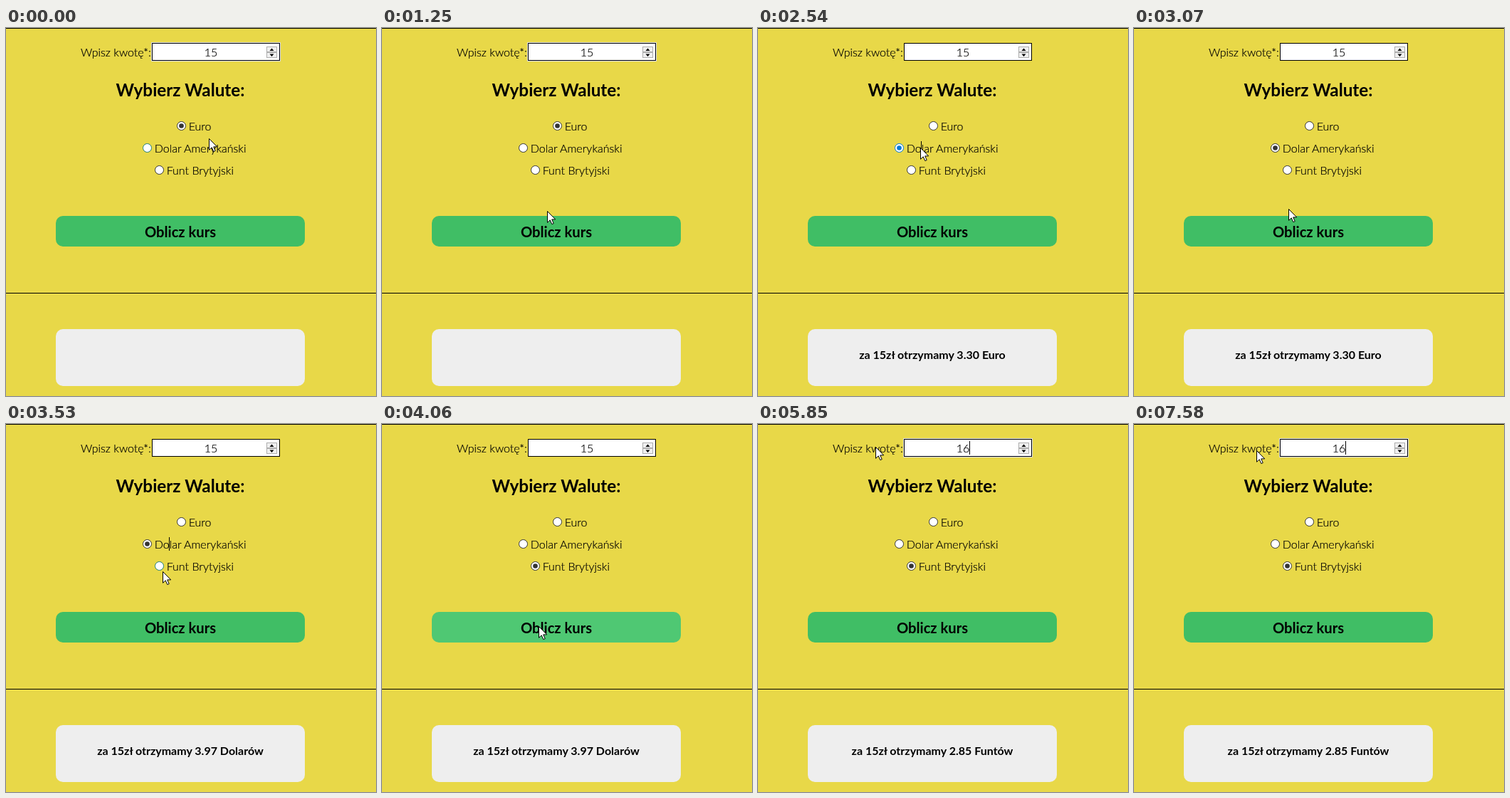
Write an HTML page that moves like this. It is 520x517 px and loops after 8000 ms.

```html
<!DOCTYPE html>
<html lang="pl">
<head>
<meta charset="utf-8">
<title>Kalkulator walut</title>
<style>
  html, body { margin: 0; width: 100%; height: 100%; overflow: hidden; background: #e8d848; }
  svg { display: block; width: 520px; height: 517px; }
  text { font: 300 16px Lato, sans-serif; stroke: #000; stroke-width: .2px; }
  .bold { font-weight: 700; stroke: none; }
  .mid { text-anchor: middle; }
</style>
</head>
<body>
<svg viewBox="0 0 520 517">
  <rect width="520" height="517" fill="#e8d848"/>
  <path d="M0 .5H520M0 372.5H520" stroke="#000"/>

  <text x="105" y="40">Wpisz kwotę*:</text>
  <rect id="focus" x="204" y="20" width="182" height="27" rx="1" fill="#dfe3f0"/>
  <rect x="205.5" y="21.5" width="179" height="24" fill="#fff" stroke="#000"/>
  <rect id="mark" x="279" y="24" width="18" height="19" fill="#0078d7"/>
  <text id="amount" class="mid" x="288" y="40">15</text>
  <rect id="caret" y="24" width="1" height="19"/>
  <g fill="#f0f0f0" stroke="#adadad">
    <rect x="366.5" y="26.5" width="14" height="7"/>
    <rect x="366.5" y="34.5" width="14" height="7"/>
  </g>
  <path d="M370.5 32h6l-3-3.5zM370.5 36.5h6l-3 3.5z"/>

  <text class="bold mid" x="245" y="96" style="font-size:24.3px">Wybierz Walute:</text>
  <g id="options"></g>
  <rect id="textCaret" x="229" y="159" width="1" height="19"/>

  <rect id="button" x="70" y="264" width="350" height="43" rx="10"/>
  <text class="bold mid" x="245" y="293.5" style="font-size:20.2px">Oblicz kurs</text>
  <rect x="70" y="423" width="350" height="80" rx="10" fill="#eee"/>
  <text id="result" class="bold mid" x="245" y="465"></text>

  <path id="cursor" d="M.5 .5V16.3L4.2 12.8 6.8 18.6 9.2 17.6 6.7 11.9H11.7Z" fill="#fff" stroke="#000"/>
</svg>
<script>
const LOOP = 8000;
const $ = id => document.getElementById(id);
const show = (el, on) => el.setAttribute('visibility', on ? 'visible' : 'hidden');
const within = (t, a, b) => t >= a && t < b;

// arrival time, x, y of the pointer tip, rest before moving on
const stops = [
  [0, 285, 155, 250], [620, 257, 102, 0], [1250, 232, 257, 0], [1500, 218, 282, 500],
  [2470, 228, 168, 400], [3170, 213, 284, 60], [3530, 220, 207, 0], [3730, 217, 198, 50],
  [4100, 220, 288, 60], [4450, 239, 241, 0], [4790, 306, 30, 80], [5200, 151, 18, 250],
  [5580, 165, 32, 1860], [7580, 172, 37, 420]
];

// when each currency is picked and its result requested
const rows = [
  { label: 'Euro', unit: 'Euro', rate: .22, x: 240, pick: 0, ask: 1520 },
  { label: 'Dolar Amerykański', unit: 'Dolarów', rate: .2647, x: 192, pick: 2470, ask: 3270 },
  { label: 'Funt Brytyjski', unit: 'Funtów', rate: .19, x: 209, pick: 3730, ask: 4170 }
];
rows.forEach((r, i) => r.y = 138 + 31 * i);
$('options').innerHTML = rows.map(r => `<g>
  <circle cx="${r.x + 6.5}" cy="${r.y - .5}" r="6" fill="#fff"/>
  <circle cx="${r.x + 6.5}" cy="${r.y - .5}" r="3.3"/>
  <text x="${r.x + 16.7}" y="${r.y + 6}">${r.label}</text></g>`).join('');
rows.forEach((r, i) => [r.ring, r.dot, r.text] = $('options').children[i].children);

function pointer(t) {
  const i = stops.findLastIndex(s => s[0] <= t);
  const [t0, x0, y0, rest] = stops[i];
  const [t1, x1, y1] = stops[i + 1] || [LOOP + 1, x0, y0];
  const k = Math.max(0, (t - t0 - rest) / (t1 - t0 - rest));
  const ease = k * k * (3 - 2 * k);
  return [x0 + (x1 - x0) * ease, y0 + (y1 - y0) * ease].map(Math.round);
}

function drawOptions(t, x, y) {
  const picked = rows.findLast(r => r.pick <= t);
  for (const r of rows) {
    const end = r.x + 17 + r.text.getComputedTextLength();
    const over = x >= r.x && x <= end && Math.abs(y - r.y) < 15;
    const on = r === picked;
    r.ring.setAttribute('stroke', !over ? '#333' : on ? '#0078d7' : '#1f7f78');
    r.dot.setAttribute('fill', over ? '#0078d7' : '#333');
    show(r.dot, on);
  }
  show($('textCaret'), within(t, 2470, 4860) && (t - 2470) % 960 < 530);
}

function drawInput(t) {
  const amount = $('amount');
  const marked = within(t, 4960, 5520);
  amount.textContent = t < 5520 ? '15' : t < 5850 ? '1' : '16';
  amount.style.fill = amount.style.stroke = marked ? '#fff' : '#000';
  show($('mark'), marked);
  show($('focus'), t < 1480 || t >= 4860);
  $('caret').setAttribute('x', Math.floor(288 + amount.getComputedTextLength() / 2));
  show($('caret'), within(t, 400, 900) || t >= 4860 && !marked && !within(t, 7040, 7440));
}

function draw(t) {
  const [x, y] = pointer(t);
  $('cursor').setAttribute('transform', `translate(${x} ${y})`);
  drawOptions(t, x, y);
  drawInput(t);

  const overButton = within(x, 70, 420) && within(y, 264, 307);
  $('button').setAttribute('fill', overButton ? '#4fc873' : '#40be65');
  const asked = rows.findLast(r => r.ask <= t);
  $('result').textContent = asked
    ? `za 15zł otrzymamy ${(15 * asked.rate).toFixed(2)} ${asked.unit}` : '';
}

const start = performance.now();
function frame() {
  draw((performance.now() - start) % LOOP);
  requestAnimationFrame(frame);
}
draw(0);
requestAnimationFrame(frame);
</script>
</body>
</html>
```
